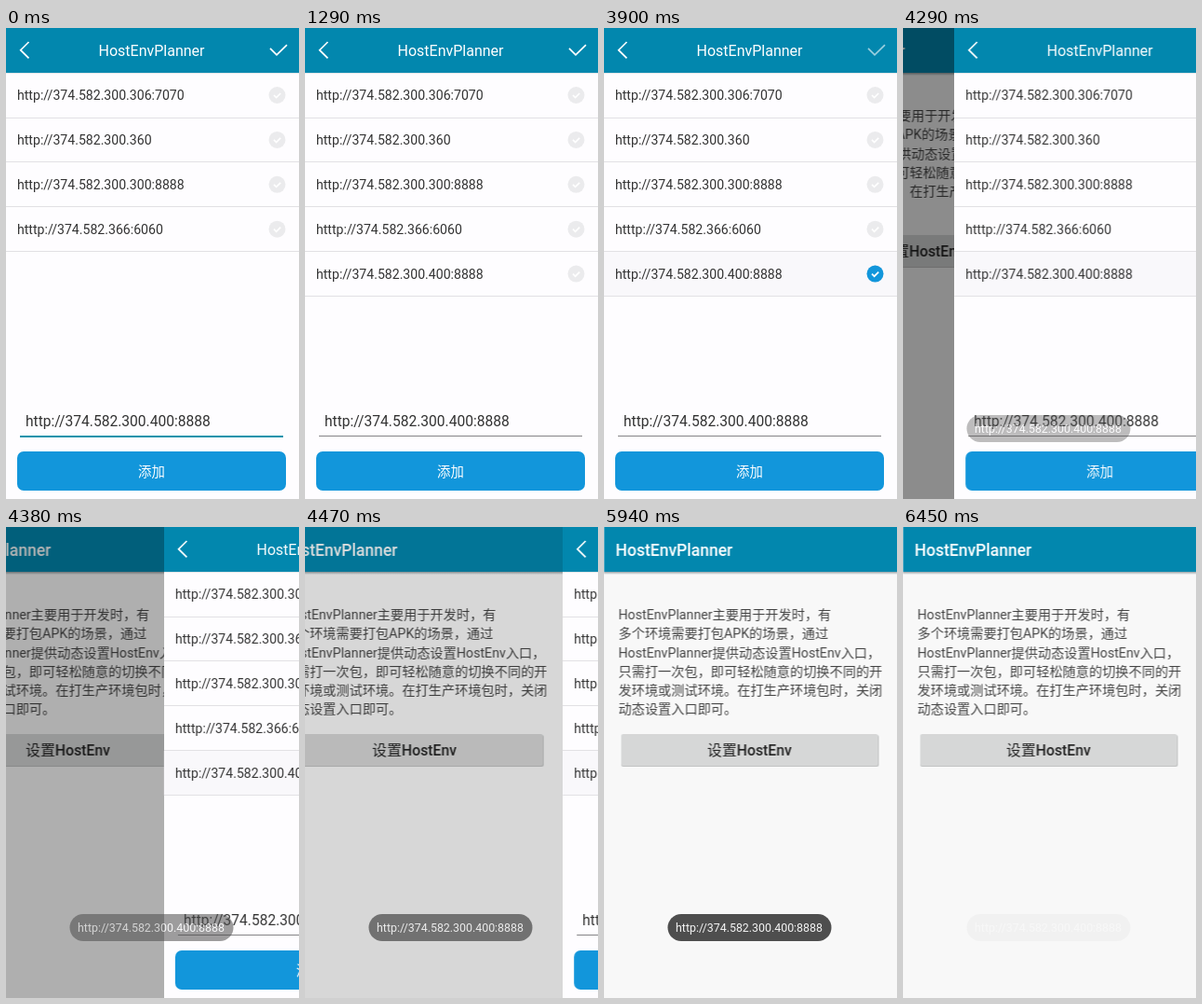
Recreate the animation shown at these times as an HTML page. Size 315 by 505 pixels, loop 7.14 s.

```html
<!DOCTYPE html>
<html lang="zh-CN">
<head>
<meta charset="utf-8">
<title>HostEnvPlanner</title>
<style>
  html, body { margin: 0; width: 100%; height: 100%; overflow: hidden; background: #f8f8f8; }
  svg { display: block; width: 315px; height: 505px; }
  text { font-family: Roboto, "Noto Sans CJK SC", "Noto Sans CJK", sans-serif; white-space: pre; }
  .bar { fill: #0287ae; }
  .white { fill: #fff; }
  .item { font-size: 14.1px; fill: #333; }
  .note { font-size: 14.2px; fill: #444; }
  .bold { font-weight: 500; }
  .mid { text-anchor: middle; }
  .line { fill: none; stroke: #fff; stroke-width: 1.7; }
</style>
</head>
<body>
<svg viewBox="0 0 315 505">
  <defs>
    <linearGradient id="shade" x2="0" y2="1">
      <stop stop-color="#56686f" stop-opacity=".6"/>
      <stop offset="1" stop-color="#56686f" stop-opacity="0"/>
    </linearGradient>
  </defs>
  <g id="home">
    <rect width="480" height="505" fill="#f8f8f8"/>
    <rect y="48" width="480" height="3" fill="url(#shade)"/>
    <rect class="bar" width="480" height="48"/>
    <text class="white bold" x="12.5" y="30.5" font-size="17.5">HostEnvPlanner</text>
    <g id="notes"></g>
    <rect x="18.5" y="223" width="277" height="34" rx="2" fill="#c2c3c3"/>
    <rect x="18.5" y="222" width="276" height="34" rx="2" fill="#d6d7d7"/>
    <text class="bold mid" x="156.5" y="245" font-size="15.8" fill="#222">设置HostEnv</text>
    <rect id="dim" width="480" height="505" opacity="0"/>
  </g>

  <g id="front">
    <rect width="315" height="505" fill="#fefdff"/>
    <rect class="bar" width="315" height="48"/>
    <rect y="48" width="315" height="1" fill="#e0e4e7"/>
    <path class="line" d="M24.5 15 L15.7 23.7 L24.5 32.3"/>
    <text class="white mid" x="156.5" y="30" font-size="16">HostEnvPlanner</text>
    <path id="done" class="line" d="M284 21.8 L291 28.8 L302 18.2"/>
    <g id="rows"></g>
    <text id="field" x="21" y="427" font-size="15.6" fill="#333"></text>
    <rect id="caret" x="220.5" y="409" width="2" height="22" fill="#1193ac"/>
    <rect id="idle" x="15" y="437" width="283" height="1" fill="#858487"/>
    <rect id="focus" x="15" y="437" width="283" height="2" fill="#1193ac"/>
    <rect id="add" x="12" y="454" width="289" height="42" rx="7" fill="#1296db"/>
    <text class="white mid" x="156.5" y="480.7" font-size="14.4">添加</text>
  </g>

  <g id="toast" opacity="0">
    <rect x="68.5" y="415" width="176" height="29" rx="14.5" fill="#484848"/>
    <text id="message" x="77" y="434.4" font-size="12.4" fill="#f4f4f4"></text>
  </g>
</svg>
<script>
const LOOP = 7140;
const $ = id => document.getElementById(id);

const added = "http://374.582.300.400:8888";
const urls = [
  "http://374.582.300.306:7070",
  "http://374.582.300.360",
  "http://374.582.300.300:8888",
  "htttp://374.582.366:6060",
  added
];
const notes = [
  "HostEnvPlanner主要用于开发时，有",
  "多个环境需要打包APK的场景，通过",
  "HostEnvPlanner提供动态设置HostEnv入口，",
  "只需打一次包，即可轻松随意的切换不同的开",
  "发环境或测试环境。在打生产环境包时，关闭",
  "动态设置入口即可。"
];

const badge = (y, color, id) =>
  `<g id="${id}"><circle cx="291.5" cy="${y}" r="9" fill="${color}"/>` +
  `<path class="line" d="M288 ${y} l2.6 2.6 l4.6 -4.6"/></g>`;

$("rows").innerHTML = urls.map((url, i) => {
  const y = 72 + i * 47.9;
  const last = i === urls.length - 1;
  return `<g id="row${i}">` +
    (last ? `<rect id="tint" y="240" width="315" height="47" fill="#f9f8fb"/>` : "") +
    `<text class="item" x="12" y="${y + 5}">${url}</text>` +
    `<rect y="${Math.round(y + 23.5)}" width="315" height="1" fill="#e2e1e4"/>` +
    badge(y, "#ebebed", "off" + i) +
    (last ? badge(y, "#1296db", "picked") : "") + "</g>";
}).join("");

$("notes").innerHTML = notes.map((line, i) =>
  `<text class="note" x="15.5" y="${99.2 + i * 20.2}">${line}</text>`).join("");

$("field").textContent = $("message").textContent = added;

// Each step is [ms, value, easing towards the next step]; without easing it holds.
function play(id, prop, steps) {
  const frames = steps.map(([ms, value, easing = "step-end"]) =>
    ({ offset: ms / LOOP, [prop]: value, easing }));
  frames.push({ offset: 1, [prop]: steps[steps.length - 1][1] });
  $(id).animate(frames, { duration: LOOP, iterations: Infinity });
}

const sine = "cubic-bezier(.364, 0, .636, 1)";
const shift = x => `translate(${x}px, 0px)`;
const from = (ms, a = 0, b = 1) => [[0, a], [ms, b]];

play("caret", "opacity", [[0, 0], [360, 1], [780, 0]]);
play("add", "fill", [[0, "#1296db"], [1110, "#0f86c6"], [1290, "#1296db"]]);
play("focus", "opacity", from(1290, 1, 0));
play("idle", "opacity", from(1290));
play("row4", "opacity", from(1290));
play("tint", "opacity", from(2670));
play("picked", "opacity", from(2670));
play("done", "opacity", [[0, 1], [3900, 0.6], [4110, 1]]);

play("front", "transform", [[0, shift(0)], [4192, shift(0), sine], [4552, shift(315)]]);
play("home", "transform", [[0, shift(-157.5)], [4190, shift(-157.5), sine], [4610, shift(0)]]);
play("dim", "opacity", [[0, 0.5], [4190, 0.5, sine], [4620, 0]]);
play("toast", "opacity", [[0, 0], [4110, 0, "linear"], [4620, 1], [5920, 1, "linear"], [6450, 0.035]]);
</script>
</body>
</html>
```
